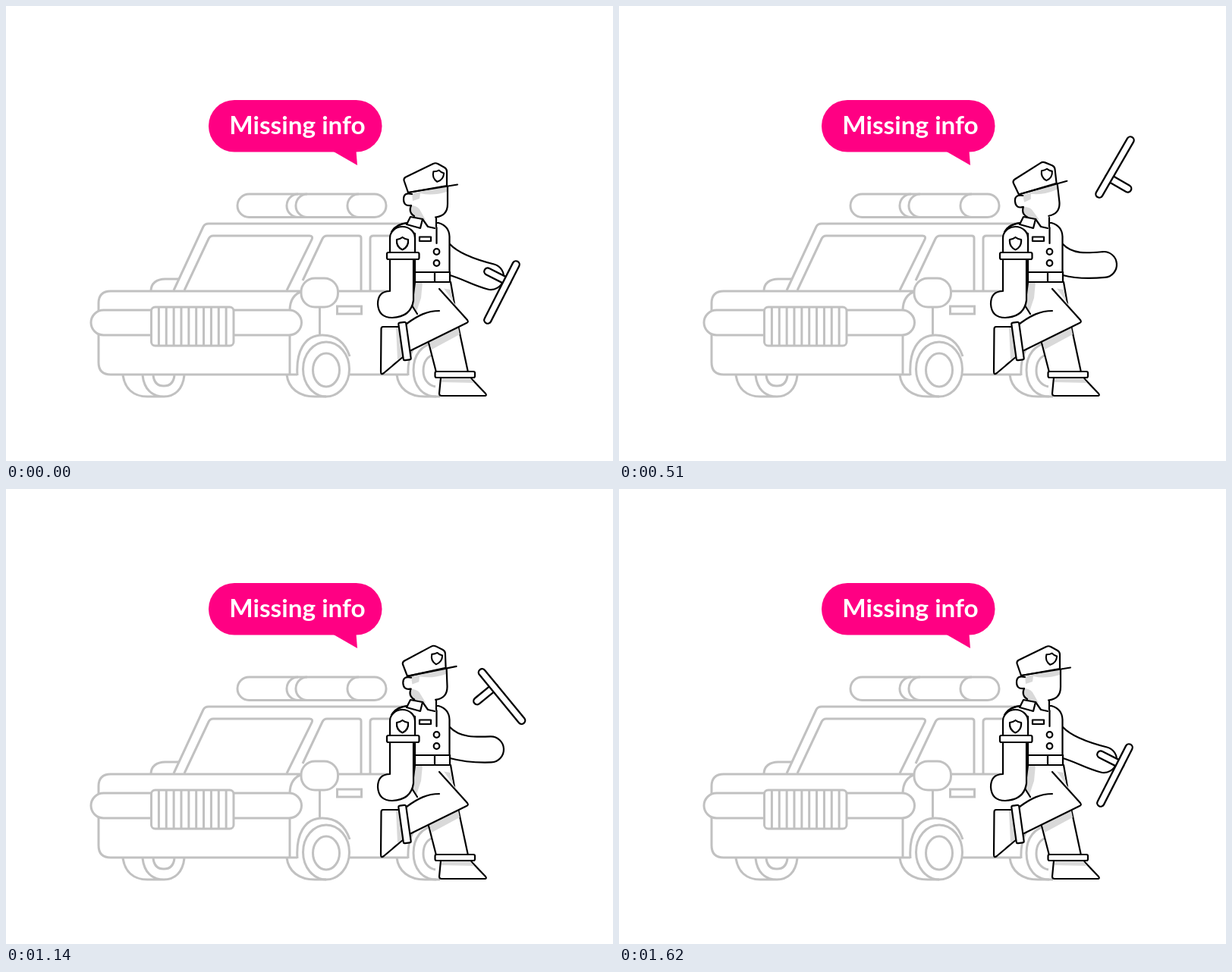
Animation of 800x600 px, one loop 2.04 s. Source, as an HTML page:

```html
<!DOCTYPE html>
<html lang="en">
<head>
<meta charset="utf-8">
<title>Missing info</title>
<style>
  html, body { margin: 0; width: 100%; height: 100%; overflow: hidden; background: #fff; }
  svg { display: block; width: 100vw; height: 100vh; }
  .car { fill: none; stroke: #c1c1c1; stroke-width: 3; }
  .cop { fill: #fff; stroke: #000; stroke-width: 2.2; stroke-linecap: round; stroke-linejoin: round; }
  .line { fill: none; }
  .shade { fill: #d9d9d9; stroke: none; }
  .plain { stroke: none; }
  .baton { fill: none; stroke-linecap: round; }
  .edge { stroke: #000; stroke-width: 11.6; }
  .core { stroke: #fff; stroke-width: 7; }
  .label { font: 700 33.3px Lato, "Open Sans", sans-serif; fill: #fff; text-anchor: middle; }
</style>
</head>
<body>
<svg viewBox="0 0 800 600">
  <defs>
    <path id="shield" d="M-7.5 -5Q-3 -5.5 0 -8Q3 -5.5 7.5 -5Q8.5 4.5 0 8.5Q-8.5 4.5 -7.5 -5Z"/>
  </defs>

  <g fill="#ff0083">
    <rect x="267" y="124" width="228.500" height="68.500" rx="34"/>
    <path d="M430 191L463 210L461 185Z"/>
  </g>
  <text class="label" x="384" y="169">Missing info</text>

  <g class="car">
    <!-- siren -->
    <rect x="305" y="248" width="196" height="30.500" rx="15.200"/>
    <path d="M385 248a15 15.200 0 0 0 0 30.500M397 248a15 15.200 0 0 0 0 30.500M465 248a15 15.200 0 0 0 0 30.500"/>
    <!-- cabin -->
    <path d="M221 375L260 291Q262 287 267 287H530"/>
    <path d="M235 375L267 307Q269 303 273 303H400Q405 303 403 308L370 375"/>
    <path d="M391 362L417 307Q419 303 423 303H465Q468 303 468 306V376"/>
    <path d="M520 303H484Q480 303 480 307V376"/>
    <path d="M191 376C191 366 198 360 210 360H227"/>
    <!-- body -->
    <path d="M122 402V392Q122 376 138 376H391Q374 381 374 402M437 376H520"/>
    <path d="M122 433V470Q122 486 138 486H384M374 433V486M453 486H530"/>
    <rect x="112" y="401" width="277.500" height="33" rx="16.500"/>
    <rect x="191.500" y="397" width="108.500" height="51" rx="5" fill="#fff"/>
    <path id="grille"/>
    <rect x="389" y="359" width="48.500" height="38" rx="18" fill="#fff"/>
    <path d="M413.500 397V434"/>
    <rect x="436.500" y="396" width="32" height="10"/>
    <!-- wheels -->
    <path d="M154 487C157 505 168 515 186 515H208C223 515 233 505 235 487M180 487C182 505 192 515 208 515M194 487C195 496 200 501 208 501C216 501 221 496 222 487"/>
    <path d="M370 486C372 504 386 515 407 515H422M384 487C382 456 393 434 417 434C435 434 447 444 453 462"/>
    <ellipse cx="422" cy="479" rx="30.500" ry="36"/>
    <ellipse cx="422" cy="480" rx="17.500" ry="22"/>
    <path d="M515 486C517 504 531 515 552 515H572M530 487C529 464 536 446 552 438"/>
    <path d="M566 444C548 446 537 460 537 480C537 501 549 515 567 515M566 459C556 461 550 469 550 481C550 492 556 500 566 502"/>
  </g>

  <g class="cop">
    <path id="arm"/>

    <!-- standing leg -->
    <path d="M556 440L567 483H609L596 422L586 364H560Z"/>
    <path class="shade" d="M558 443L596 424L598 433L561 453Z"/>
    <path class="shade" d="M567 371L586 374L591 395Z"/>
    <path d="M573 490L571 511Q571 514 574 514H631Q634 514 632 511L612 490Z"/>
    <path class="shade" d="M574 491H612L617 497L574 496Z"/>
    <rect x="565.500" y="482" width="52.500" height="8" rx="2"/>

    <!-- raised leg -->
    <path class="plain" d="M539 364H571L609 417L532 455L528 418L543 405Z"/>
    <path class="shade" d="M539 364H549L547 385L541 403L536 395Z"/>
    <path class="line" d="M539 364L535 395L542 406M571 373L608 414Q610 417 607 418L532 455M528 419C543 408 555 402 571 402"/>
    <path d="M519 423H497Q494.500 423 494.500 426L494 482Q494 487 498 484L524 462Z"/>
    <path class="shade" d="M514 424H519L523 461L516 467Z"/>
    <rect x="-5" y="-25" width="10" height="50" rx="2" transform="translate(525.500 442) rotate(-8)"/>

    <!-- shirt and belt -->
    <path d="M539 351V300L514 292Q520 287 530 286H570Q584 290 584.500 304V351Z"/>
    <rect x="539" y="351" width="46" height="13"/>
    <path class="line" d="M565 351V364M567.500 292V313"/>
    <circle cx="567.500" cy="324" r="3.800"/>
    <circle cx="567.500" cy="339" r="3.800"/>
    <rect x="545" y="304.500" width="15" height="5.500"/>

    <!-- neck -->
    <path class="plain" d="M536 266H568V282L565 293L549 287L535 279Z"/>

    <g id="head">
      <path class="plain" d="M534 243L582 236V262Q581 277 566 279L548 283L534 277Z"/>
      <path class="shade" d="M535 247L581 238V245Q562 251 546 247L545 254L536 257Z"/>
      <path class="shade" d="M533 263Q541 263 545 268L553 282L534 277Z"/>
      <path class="line" d="M582 238V261Q582 277 566 278.500M534 263Q530 272 538 277"/>
      <path d="M535 248Q524 245 524 255Q524 264 533 263"/>
      <path d="M530 246L524.500 230Q524 227 527 225.500L563 208Q566 206.500 569 208L578 213Q581 215 581 218V237Z"/>
      <path class="line" d="M530 246L595 235.500"/>
      <use href="#shield" transform="translate(569.500 224) rotate(9) scale(.93)"/>
    </g>

    <!-- collar -->
    <path d="M533 278L528 288L546 293L549 281Z"/>
    <path class="line" d="M549 281L556 291L565 293M567 279V291"/>

    <!-- near arm -->
    <path d="M506 326V306A16.500 15 0 0 1 539 306V326Z"/>
    <path class="line" d="M508 298Q514 287 529 286"/>
    <use href="#shield" x="522.500" y="313"/>
    <path d="M506 334V376Q490 376 490 393Q491 411 509 411Q534 410 537 388V334Z"/>
    <rect x="502" y="325" width="42.500" height="9" rx="2"/>
  </g>

  <g id="baton" class="baton">
    <path class="edge" d="M16 0V-29"/>
    <path class="core" d="M16 0V-29"/>
    <path class="edge" d="M-41 0H41"/>
    <path class="core" d="M-41 0H41"/>
  </g>
</svg>

<script>
const LOOP = 2040, REST = 1620, STEP = 30;

// [time, value] pairs
const spin = [[0, -63], [360, -20], [510, 120], [750, 395], [990, 516], [1260, 629], [1620, 657]];
const lift = [[0, 377.5], [150, 383], [360, 318], [510, 212.5], [750, 208], [880, 204.5],
              [990, 205.5], [1080, 236], [1260, 353.5], [1390, 386], [1620, 377.5]];
const hand = [[0, 357], [150, 362], [360, 352], [510, 341], [1080, 341], [1260, 354], [1390, 363], [1620, 357]];
const nod = [[0, 0], [150, 1], [360, -1.3], [510, -6.5], [750, -10], [990, -10], [1260, 3.5], [1620, 0]];

const el = id => document.getElementById(id);
const arm = el('arm'), head = el('head'), baton = el('baton');

el('grille').setAttribute('d',
  Array.from({ length: 10 }, (_, i) => `M${201.4 + i * 9.86} 398V447`).join(''));

const slope = (k, i) => (k[i + 1][1] - k[i][1]) / (k[i + 1][0] - k[i][0]);

// Harmonic mean keeps the curve from overshooting its keys.
function tangent(k, i) {
  if (i === 0 || i === k.length - 1) return 0;
  const a = slope(k, i - 1), b = slope(k, i);
  return a * b > 0 ? 2 * a * b / (a + b) : 0;
}

function sample(k, t) {
  let i = 0;
  while (i < k.length - 2 && t >= k[i + 1][0]) i++;
  const [t0, v0] = k[i], [t1, v1] = k[i + 1];
  const d = t1 - t0, u = (t - t0) / d, w = 1 - u;
  return w * w * (1 + 2 * u) * v0 + u * u * (3 - 2 * u) * v1
       + d * u * w * (w * tangent(k, i) - u * tangent(k, i + 1));
}

function armPath(y) {
  const x = 639, r = 17, a = (-5 + (y - 341) * 1.2) * Math.PI / 180;
  const c = Math.cos(a), s = Math.sin(a);
  const at = (along, up) => `${x + along * c + up * s} ${y + along * s - up * c}`;
  return `M585 314C598 328 ${at(-20, r)} ${at(0, r)}A${r} ${r} 0 0 1 ${at(0, -r)}`
       + `C${at(-20, -r)} 600 359 585 355`;
}

function draw(now) {
  const t = Math.min(Math.floor(now % LOOP / STEP) * STEP, REST);
  arm.setAttribute('d', armPath(sample(hand, t)));
  head.setAttribute('transform', `rotate(${sample(nod, t)} 551 274)`);
  baton.setAttribute('transform', `translate(653.5 ${sample(lift, t)}) rotate(${sample(spin, t)})`);
}

function tick() {
  draw(performance.now() - start);
  requestAnimationFrame(tick);
}

const start = performance.now();
tick();
</script>
</body>
</html>
```
